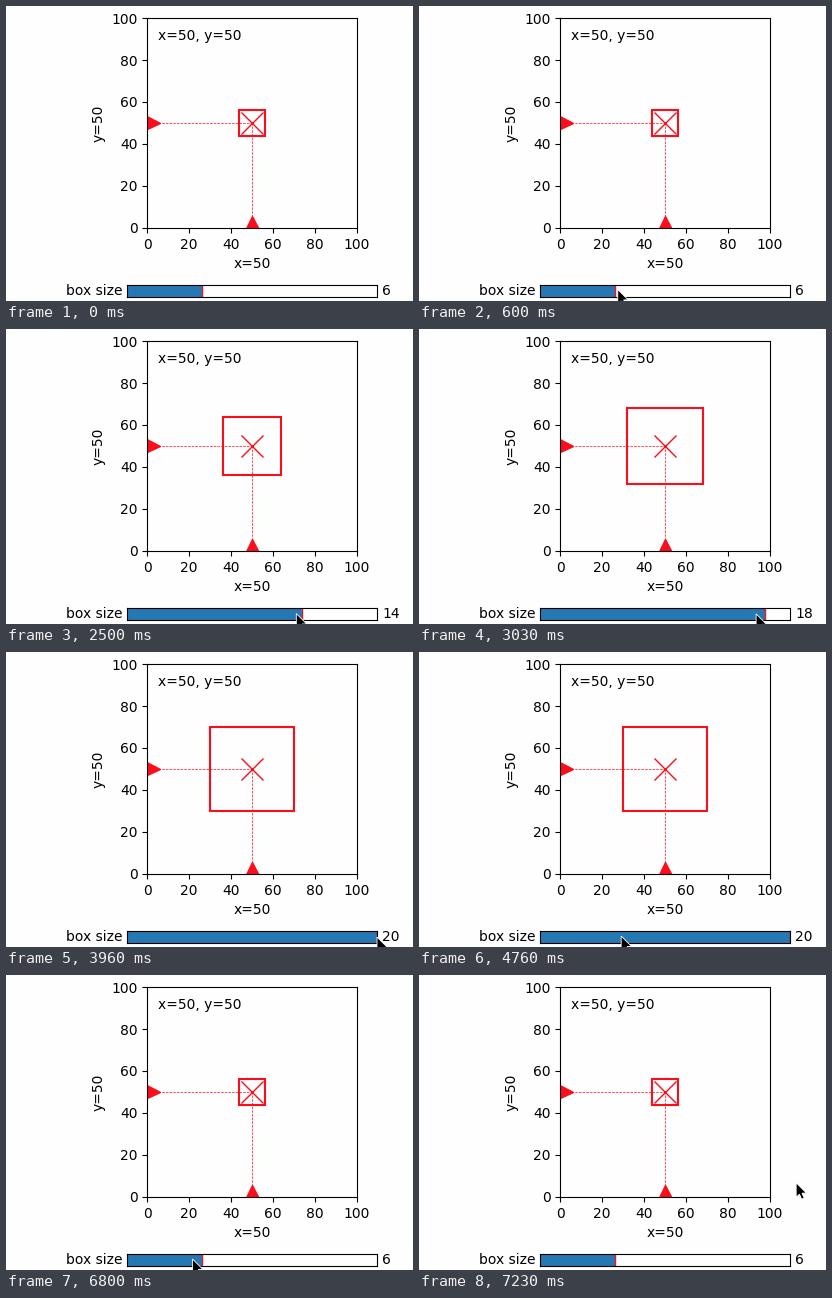
Recreate the animation shown at these times as a matplotlib script. Size 407 px wide and 295 px high, loop 8900 ms.

```python
import numpy as np
import matplotlib.pyplot as plt
from matplotlib.animation import FuncAnimation
from matplotlib.patches import Polygon, Rectangle

W, H, DPI = 407, 295, 100
LOOP, STEP = 8900, 20
RED, BLUE, PAPER = "#fc0d1b", "#2678b2", "#fefefe"
BAR_X, BAR_W, MAX_SIZE = 121.2, 250, 20
START_SIZE, SIZE_STEP = 6, 2
ENTER, GRAB, RELEASE, CLICK, LEAVE = 60, 1530, 3960, 5230, 7230

plt.rcParams.update({"font.family": "DejaVu Sans", "font.size": 10})
fig = plt.figure(figsize=(W / DPI, H / DPI), dpi=DPI, facecolor=PAPER)


def add_axes(left, top, right, bottom):
    """Axes placed by pixel edges measured from the top left."""
    return fig.add_axes(
        [left / W, 1 - bottom / H, (right - left) / W, (bottom - top) / H],
        facecolor=PAPER)


# Main plot
ticks = range(0, 101, 20)
ax = add_axes(141.2, 12.1, 350.9, 221.8)
ax.set(xlim=(0, 100), ylim=(0, 100), xlabel="x=50", ylabel="y=50",
       xticks=ticks, yticks=ticks)
ax.text(0.05, 0.95, "x=50, y=50", transform=ax.transAxes, va="top")
for x, y, marker in [(0, 50, ">"), (50, 0, "^")]:
    ax.plot([x, 50], [y, 50], "--", color=RED, lw=0.5)
    ax.plot(x, y, marker, color=RED, ms=18)
ax.plot(50, 50, "x", color=RED, ms=16)
box = ax.add_patch(Rectangle((0, 0), 1, 1, fill=False, ec=RED, lw=1.5))

# Slider
bar = add_axes(BAR_X, 278.8, BAR_X + BAR_W, 290.8)
bar.set(xlim=(0, MAX_SIZE), ylim=(0, 1), xticks=[], yticks=[])
fill = bar.add_patch(Rectangle((0, 0), START_SIZE, 1, fc=BLUE, ec="none"))
mark = bar.axvline(START_SIZE, color=RED, lw=1)
bar.text(-0.02, 0.5, "box size", transform=bar.transAxes, ha="right", va="center")
value = bar.text(1.02, 0.5, "", transform=bar.transAxes, va="center")

# Mouse pointer on a pixel overlay
top = add_axes(0, 0, W, H)
top.set(xlim=(0, W), ylim=(H, 0))
top.axis("off")
ARROW = np.array([(0, 0), (0, 14.5), (3.3, 11.4), (5.5, 16.5),
                  (8, 15.4), (5.9, 10.4), (10.4, 10.4)])
pointer = top.add_patch(Polygon(ARROW, fc="black", ec="white", lw=0.6))


def linear(u):
    return u


def ease_in(u):
    return u ** 1.5


def ease_out(u):
    return 1 - (1 - u) ** 2


def ease_both(u):
    return u * u * (3 - 2 * u)


# Pointer glides: start, end, destination, easing
ENTRY = (374, 233)
GLIDES = [
    (ENTER, 660, (197, 284), ease_out),
    (1300, 1330, (203, 284), linear),
    (GRAB, 3230, (356, 285), linear),
    (3390, 3460, (371, 285), linear),
    (RELEASE, 4830, (199, 284), ease_both),
    (4860, 5060, (186.5, 284), linear),
    (6800, LEAVE, (384, 205), ease_in),
]


def tip_at(t):
    tip = np.array(ENTRY, float)
    for start, end, goal, ease in GLIDES:
        u = np.clip((t - start) / (end - start), 0, 1)
        tip += (np.array(goal) - tip) * ease(u)
    return tip


def size_at(t):
    """The slider follows the held pointer, then jumps on the last click."""
    if t < GRAB:
        return START_SIZE
    held = min(t, RELEASE) if t < CLICK else t
    if t > LEAVE - 500:
        held = CLICK
    raw = (tip_at(held)[0] - BAR_X) / BAR_W * MAX_SIZE
    return SIZE_STEP * round(raw / SIZE_STEP)


def update(frame):
    t = frame * STEP
    size = size_at(t)
    box.set_bounds(50 - size, 50 - size, 2 * size, 2 * size)
    fill.set_width(size)
    mark.set_xdata([size, size])
    value.set_text(f"{size:d}")
    pointer.set_visible(ENTER <= t < LEAVE)
    pointer.set_xy(ARROW + tip_at(t))
    return box, fill, mark, value, pointer


anim = FuncAnimation(fig, update, frames=LOOP // STEP, interval=STEP,
                     repeat=True, repeat_delay=0)
plt.show()
```
